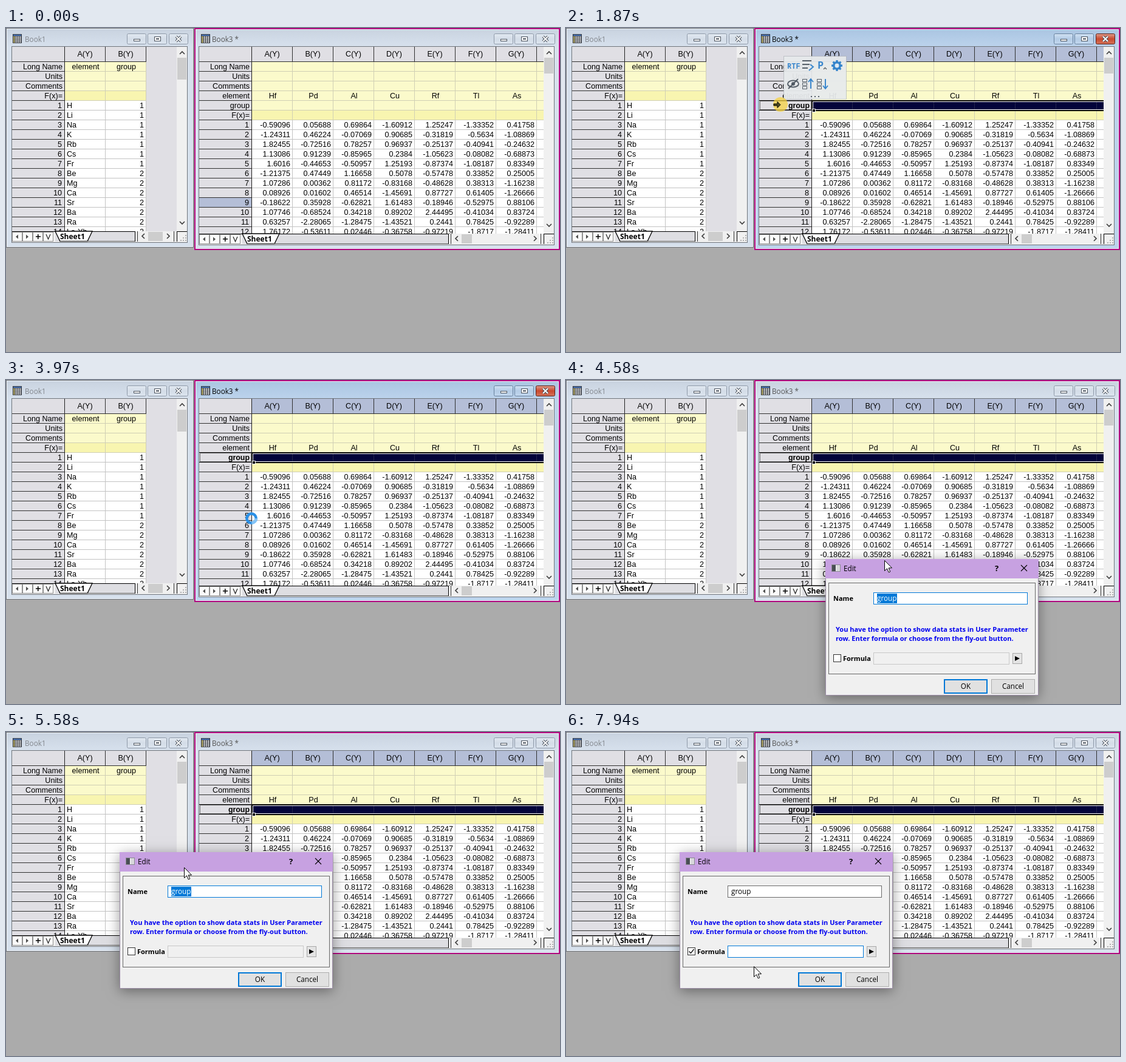
An HTML page with a canvas that plays this animation: 912x534 px, repeating every 8 s.

```html
<!DOCTYPE html>
<html lang="en">
<head>
<meta charset="utf-8">
<title>Worksheet label row</title>
<style>
html, body { margin: 0; width: 100%; height: 100%; overflow: hidden; background: #ababab; }
canvas { display: block; }
</style>
</head>
<body>
<canvas id="stage" width="912" height="534"></canvas>
<script>
const ctx = document.getElementById('stage').getContext('2d');
const LOOP = 8000;
const ARIAL = '12.6px "Liberation Sans", sans-serif';
const ARIAL_BOLD = 'bold 12.4px "Liberation Sans", sans-serif';
const UI = '11.7px "Open Sans", sans-serif';
const UI_BOLD = 'bold 11px "Open Sans", sans-serif';
const HEAD = '#e0dfe4', PICKED = '#b4bed7', BLUE = '#0078d7';

const table = `-0.59096 0.05688 0.69864 -1.60912 1.25247 -1.33352 0.41758
-1.24311 0.46224 -0.07069 0.90685 -0.31819 -0.5634 -1.08869
1.82455 -0.72516 0.78257 0.96937 -0.25137 -0.40941 -0.24632
1.13086 0.91239 -0.85965 0.2384 -1.05623 -0.08082 -0.68873
1.6016 -0.44653 -0.50957 1.25193 -0.87374 -1.08187 0.83349
-1.21375 0.47449 1.16658 0.5078 -0.57478 0.33852 0.25005
1.07286 0.00362 0.81172 -0.83168 -0.48628 0.38313 -1.16238
0.08926 0.01602 0.46514 -1.45691 0.87727 0.61405 -1.26666
-0.18622 0.35928 -0.62821 1.61483 -0.18946 -0.52975 0.88106
1.07746 -0.68524 0.34218 0.89202 2.44495 -0.41034 0.83724
0.63257 -2.28065 -1.28475 -1.43521 0.2441 0.78425 -0.92289
1.76172 -0.53611 0.02446 -0.36758 -0.97219 -1.8717 -1.28411`
  .split('\n').map(row => row.split(' '));
const groups = 'H Li Na K Rb Cs Fr Be Mg Ca Sr Ba Ra La-Yb'.split(' ')
  .map((name, i) => [name, i < 7 ? '1' : '2']);

const listBook = {
  x: 0, w: 309, h: 362, title: 'Book1', left: 10, cols: 2, view: 281, bottom: 335,
  slab: 212, thumbX: 234, thumbW: 24, thumbH: 36, rows: groups, textFirst: true,
  labels: ['Long Name', 'Units', 'Comments', 'F(x)='],
  labelCells: { 0: ['element', 'group'] }
};
const dataBook = {
  x: 310, w: 602, h: 366, title: 'Book3 *', left: 318, cols: 8, view: 885, bottom: 339,
  slab: 728, thumbX: 750, thumbW: 17, thumbH: 26, rows: table,
  labels: ['Long Name', 'Units', 'Comments', 'element', 'group', 'F(x)='],
  labelCells: { 3: 'Hf Pd Al Cu Rf Tl As'.split(' ') }
};
const menuGroups = [
  ['Cut', 'Copy', 'Paste', 'Clear'],
  ['Edit...', 'Delete'],
  ['Insert', 'Add User Parameters...', 'Move Up'],
  ['Move Down', 'Hide'],
  ['Set Data Style', 'Fill Cells With'],
  ['Row Height...', 'Format Cells...'],
  ['View']
];

// time, x, y, easing power of the move that ends there
const pointerPath = [
  [240, 850, 540, 1], [1010, 358, 123, 1.7], [1320, 353, 126, 2], [2730, 353, 126, 1],
  [3330, 405, 227, 1.6], [3500, 404, 227, 1], [4200, 404, 227, 1], [4500, 524, 295, 2],
  [4750, 524, 300, 1], [5030, 319, 230, 1], [5200, 284, 203, 1.6], [5370, 284, 203, 1],
  [5580, 293, 223, 1], [6200, 209, 367, 1.7], [6790, 209, 367, 1], [7540, 309, 386, 1.7]
];
const pressTimes = [[1480, 2010], [3740, 3970], [4750, 5370], [6460, 6600]];
const during = (t, from, to) => t >= from && t < to;

function pointerAt(t) {
  const i = pointerPath.findIndex(p => p[0] > t);
  if (i === 0) return { x: pointerPath[0][1], y: pointerPath[0][2] };
  if (i < 0) { const p = pointerPath.at(-1); return { x: p[1], y: p[2] }; }
  const [t0, x0, y0] = pointerPath[i - 1], [t1, x1, y1, power] = pointerPath[i];
  const k = 1 - Math.pow(1 - (t - t0) / (t1 - t0), power);
  return { x: Math.round(x0 + (x1 - x0) * k), y: Math.round(y0 + (y1 - y0) * k) };
}

function rect(x, y, w, h, color) {
  ctx.fillStyle = color;
  ctx.fillRect(x, y, w, h);
}
function box(x, y, w, h, fill, line, width = 1) {
  rect(x, y, w, h, line);
  rect(x + width, y + width, w - 2 * width, h - 2 * width, fill);
}
function text(s, x, y, font = ARIAL, color = '#000', align = 'left') {
  ctx.font = font;
  ctx.fillStyle = color;
  ctx.textAlign = align;
  ctx.fillText(s, x, y);
}
function path(points, stroke, width = 1, fill) {
  ctx.beginPath();
  points.forEach(([x, y], i) => i ? ctx.lineTo(x, y) : ctx.moveTo(x, y));
  if (fill) { ctx.closePath(); ctx.fillStyle = fill; ctx.fill(); }
  if (stroke) { ctx.strokeStyle = stroke; ctx.lineWidth = width; ctx.stroke(); }
}
function disc(x, y, r, color) {
  ctx.beginPath();
  ctx.arc(x, y, r, 0, 7);
  ctx.fillStyle = color;
  ctx.fill();
}
function clipped(x, y, w, h, draw) {
  ctx.save();
  ctx.beginPath();
  ctx.rect(x, y, w, h);
  ctx.clip();
  draw();
  ctx.restore();
}
function chevron(x, y, dx, dy, color = '#404040') {
  path([[x - dx * 2 - dy * 4, y - dy * 2 - dx * 4], [x + dx * 2, y + dy * 2],
    [x - dx * 2 + dy * 4, y - dy * 2 + dx * 4]], color, 1.7);
}

function titleBar(b, active) {
  const { x, w, h } = b, owned = b === dataBook;
  const shade = ctx.createLinearGradient(0, 0, 0, 31);
  shade.addColorStop(0, active ? '#a9c4e1' : '#c8d2df');
  shade.addColorStop(1, active ? '#bcd3ec' : '#d7e1ed');
  rect(x, 0, w, h, active ? '#bcd3ec' : '#d7e1ed');
  rect(x, 0, w, 31, shade);
  ctx.strokeStyle = owned ? '#b0087f' : '#686c72';
  ctx.lineWidth = owned ? 2 : 1;
  const inset = owned ? 1 : 0.5;
  ctx.strokeRect(x + inset, inset, w - 2 * inset, h - 2 * inset);
  ctx.strokeStyle = '#eef3f9';
  ctx.lineWidth = 1;
  ctx.strokeRect(x + inset * 2 + 0.5, inset * 2 + 0.5, w - inset * 4 - 1, h - inset * 4 - 1);

  box(x + 11, 10, 15, 15, '#30343c', '#30343c');
  rect(x + 12, 11, 13, 2, '#4f79b8');
  for (let r = 0; r < 4; r++)
    for (let c = 0; c < 4; c++)
      rect(x + 12 + c * 3.4, 14 + r * 2.7, 2.4, 1.7, c ? '#fff' : '#f2e27a');
  text(b.title, x + (owned ? 29 : 31), 23, UI, active ? '#000' : owned ? '#555' : '#82868c');

  const right = x + w - (owned ? 10 : 11);
  [99, 65, 30].forEach((offset, i) => {
    const bx = right - offset, red = active && i === 2;
    const face = ctx.createLinearGradient(0, 9, 0, 27);
    face.addColorStop(0, red ? '#e0a090' : active ? '#d2e2f3' : '#e2e9f1');
    face.addColorStop(0.5, red ? '#c9492f' : active ? '#b4cce6' : '#d4dde8');
    face.addColorStop(1, red ? '#d6765c' : active ? '#c3d8ef' : '#dce5ef');
    ctx.beginPath();
    ctx.roundRect(bx + 0.5, 9.5, 31, 17, 2);
    ctx.fillStyle = face;
    ctx.fill();
    ctx.strokeStyle = red ? '#5b2119' : active ? '#67809d' : '#8e99a8';
    ctx.stroke();
    const mid = bx + 16, ink = '#4b535e';
    if (i === 0) box(mid - 5, 18, 11, 4, '#fff', ink);
    if (i === 1) { box(mid - 5, 14, 11, 8, '#fff', ink); rect(mid - 2, 17, 5, 2, ink); }
    if (i === 2) for (const [color, width] of [[ink, 4], ['#fff', 2]]) {
      path([[mid - 4, 14], [mid + 4, 22]], color, width);
      path([[mid + 4, 14], [mid - 4, 22]], color, width);
    }
  });
}

function grid(b, selected) {
  const first = b.left + 86, count = b.labels.length, dataTop = 56 + count * 16;
  const colX = c => first + 1 + c * 67;
  rect(b.left, 31, b.view - b.left, b.bottom - 31, HEAD);
  for (let c = 0; c < b.cols; c++) {
    const x = colX(c);
    rect(x, 31, 66, 24, selected ? PICKED : HEAD);
    rect(x + 66, 31, 1, 24, '#303030');
    if (c < 7) text('ABCDEFG'[c] + '(Y)', x + 33, 47, ARIAL, '#000', 'center');
  }
  rect(first, 31, 1, b.bottom - 31, '#202020');
  rect(b.left, 55, colX(b.cols) - b.left, 1, '#303030');

  for (let r = 0; r < count + b.rows.length; r++) {
    const y = 56 + r * 16, label = r < count, row = r - count;
    const tone = !label ? '#fff' : r === count - 1 ? '#f8f5b0' : '#fbfacb';
    const marked = b === dataBook && !selected && row === 8;
    const bold = b === dataBook && selected && r === 4;
    if (marked) rect(b.left, y, 86, 15, PICKED);
    rect(b.left, y + 15, 86, 1, '#303030');
    text(label ? b.labels[r] : row + 1, first - (label ? 3 : 4), y + 12,
      bold ? ARIAL_BOLD : ARIAL, '#000', 'right');
    const cells = label ? b.labelCells[r] || [] : b.rows[row];
    for (let c = 0; c < b.cols; c++) {
      const x = colX(c);
      rect(x, y, 67, 16, label ? '#d0cfb4' : '#c3c3c3');
      rect(x, y, 66, 15, tone);
      if (!cells[c]) continue;
      if (label) text(cells[c], x + 34, y + 12, ARIAL, '#000', 'center');
      else if (b.textFirst && c === 0) text(cells[c], x + 3, y + 12);
      else text(cells[c], x + 63, y + 12, ARIAL, '#000', 'right');
    }
  }
  if (b === dataBook && selected) {
    rect(first + 1, 119, 500, 18, '#000');
    rect(first + 2, 121, 500, 14, '#fff');
    rect(first + 3, 122, 500, 12, '#03043a');
    for (let c = 1; c < 8; c++) rect(colX(c) - 1, 122, 1, 12, '#24254a');
    box(first + 1, 133, 6, 6, '#000', '#fff');
    ctx.setLineDash([1, 1]);
    ctx.strokeStyle = '#000';
    ctx.lineWidth = 1;
    ctx.strokeRect(b.left + 1.5, 120.5, 84, 14);
    ctx.setLineDash([]);
    rect(b.left, 119, 87, 1, '#000');
    rect(b.left, 135, 87, 1, '#000');
  }
}

function bars(b) {
  const y = b.bottom + 1, v = b.view, right = v + 17;
  rect(v, 31, 17, b.bottom - 31, '#f0f0f0');
  chevron(v + 9, 41, 0, -1);
  chevron(v + 9, b.bottom - 14, 0, 1);
  rect(v + 1, 49, 15, b.thumbH, '#cdcdcd');

  rect(b.left, b.bottom, right - b.left, 18, '#f0f0f0');
  rect(b.left, b.bottom, b.slab - b.left + 1, 1, '#000');
  for (let i = 0; i < 4; i++) {
    const x = b.left + i * 17.3 | 0, m = x + 8, c = y + 8;
    box(x, y, 17, 16, '#fafafa', '#909090');
    if (i < 2) {
      const s = i ? 1 : -1;
      path([[m + 2 * s, c], [m - 2 * s, c - 3.5], [m - 2 * s, c + 3.5]], null, 1, '#505050');
    }
    if (i === 2) { rect(m - 3, c - 1, 8, 1.5, '#000'); rect(m, c - 4, 1.5, 8, '#000'); }
    if (i === 3) path([[m - 3, c - 4], [m + 0.5, c + 4], [m + 4, c - 4]], '#202020', 1.2);
  }
  const tab = b.left + 71;
  rect(tab, y, b.slab - tab, 16, '#dedee2');
  path([[tab, y - 1], [tab + 8, y + 15.5], [tab + 53, y + 15.5], [tab + 61, y - 1]], '#000', 1.3, '#fff');
  rect(tab + 8, y + 15, b.slab - tab - 7, 1, '#555');
  rect(b.slab, y - 1, 1, 17, '#000');
  text('Sheet1', tab + 8, y + 12, 'bold 12px "Open Sans", sans-serif');

  rect(b.slab + 4, y - 1, 1, 17, '#333');
  chevron(b.slab + 14, y + 7, -1, 0);
  chevron(v - 14, y + 7, 1, 0);
  rect(b.thumbX, y, b.thumbW, 15, '#cdcdcd');
  rect(v - 5, y - 1, 1, 17, '#333');
  rect(v, y - 1, 1, 17, '#000');
  rect(v, y - 1, 17, 1, '#000');
  for (let i = 0; i < 3; i++)
    for (let j = 0; j <= i; j++) rect(right - 3 - j * 4, y + 5 + i * 4, 2, 2, '#b0b0b0');
}

function book(b, active, selected) {
  titleBar(b, active);
  const right = b.view + 17;
  box(b.left - 1, 30, right - b.left + 2, b.h - 38, '#f0f0f0', '#70757c');
  clipped(b.left, 31, b.view - b.left, b.bottom - 31, () => grid(b, selected));
  bars(b);
}

function toolbar(t) {
  const fade = Math.min(1, (t - 1600) / 270);
  ctx.globalAlpha = fade * 0.76;
  box(358, 46, 104, 72, '#f4f6f8', '#b4b8be');
  ctx.globalAlpha = fade * 0.92;
  const blue = '#2c7fca', gray = '#4c5660';
  text('RTF', 364, 67, 'bold 12px "Noto Sans Mono", monospace', blue);
  [54, 60, 66].forEach((y, i) => path([[389, y], [404 - i * 3, y]], gray, 2));
  path([[402, 60], [407, 64], [400, 70]], blue, 2);
  text('P', 414, 67, 'bold 16px "Open Sans", sans-serif', blue);
  path([[424, 68], [426.5, 65.5], [429, 68]], gray, 1.4);
  for (let i = 0; i < 8; i++) {
    const c = Math.cos(i * Math.PI / 4), s = Math.sin(i * Math.PI / 4);
    path([[446 + c * 5, 62 + s * 5], [446 + c * 9, 62 + s * 9]], blue, 3.4);
  }
  disc(446, 62, 7, blue);
  disc(446, 62, 3.4, '#eef2f6');
  ctx.beginPath();
  ctx.ellipse(374, 92, 9, 5.5, 0, 0, 7);
  ctx.strokeStyle = gray;
  ctx.lineWidth = 2;
  ctx.stroke();
  disc(374, 92, 3, gray);
  path([[366, 100], [382, 84]], gray, 2);
  [389, 413].forEach((x, i) => {
    for (let k = 0; k < 3; k++) box(x, 84 + k * 6, 8, 5, '#f4f6f8', gray);
    const s = i ? 1 : -1;
    path([[x + 14, 92 - 8 * s], [x + 14, 92 + 7 * s]], blue, 2);
    path([[x + 10, 92 + 3 * s], [x + 14, 92 + 8 * s], [x + 18, 92 + 3 * s]], blue, 2);
  });
  for (let i = 0; i < 3; i++) rect(403 + i * 6, 112, 2, 2, gray);
  ctx.globalAlpha = 1;
}

function shadow(x, y, w, h, blur, alpha) {
  ctx.save();
  ctx.shadowColor = `rgba(0,0,0,${alpha})`;
  ctx.shadowBlur = blur;
  ctx.shadowOffsetY = blur / 5;
  rect(x, y, w, h, '#f0f0f0');
  ctx.restore();
}

function menu(t, pointer) {
  ctx.globalAlpha = t < 2080 ? 0.5 : 1;
  shadow(352, 126, 201, 405, 6, 0.5);
  box(352, 126, 201, 405, '#f2f2f2', '#a8a8a8');
  let y = 128;
  menuGroups.forEach((items, g) => {
    if (g) { rect(380, y + 3, 170, 1, '#d0d0d0'); y += 8; }
    for (const item of items) {
      if (t >= 2800 && during(pointer.y, y, y + 22)) rect(355, y, 195, 22, '#91c9f7');
      text(item, 384, y + 15, UI);
      if (/Insert|Style|With|View/.test(item)) chevron(540, y + 11, 0.7, 0);
      y += 22;
    }
  });
  ctx.globalAlpha = 1;
}

function dialog(t, x, y) {
  ctx.save();
  ctx.globalAlpha = Math.min(1, 0.4 + (t - 4200) / 150);
  shadow(x, y, 351, 225, 20, 0.4);
  ctx.translate(x, y);
  box(0, 0, 351, 225, '#f0f0f0', '#9b8ca6');
  rect(0, 0, 351, 32, '#c7a1e1');
  box(10, 9, 15, 12, '#fff', '#8a8a92');
  rect(11, 10, 6, 10, '#4a4e54');
  rect(18, 10, 6, 10, '#d8d8dc');
  text('Edit', 30, 20, UI);
  text('?', 282, 20, 'bold 13px "Open Sans", sans-serif', '#000', 'center');
  path([[322, 10], [332, 20]], '#000', 1.1);
  path([[332, 10], [322, 20]], '#000', 1.1);
  box(5, 39, 341, 151, '#f0f0f0', '#686868');

  const naming = t < 6460;
  text('Name', 13, 69, UI_BOLD);
  box(79, 55, 254, 20, '#fff', naming ? BLUE : '#6a6a6a');
  if (naming) rect(85, 57, 33, 16, BLUE);
  text('group', 85, 69, UI, naming ? '#fff' : '#000');
  text('You have the option to show data stats in User Parameter', 17, 120, UI_BOLD, '#0000f0');
  text('row. Enter formula or choose from the fly-out button.', 17, 135, UI_BOLD, '#0000f0');

  const over = during(t, 6000, 6950), pressed = during(t, 6460, 6690), checked = t >= 6690;
  box(13, 157, 13, 13, pressed ? '#c3dff5' : '#fff', pressed ? '#005499' : over ? BLUE : '#333');
  if (checked) path([[15.5, 163.5], [18.5, 166.5], [23.5, 160]], over ? BLUE : '#111', 1.4);
  text('Formula', 29, 168, UI_BOLD);
  const enabled = t >= 6600;
  box(79, 154, 224, 20, enabled ? '#fff' : '#f0f0f0', checked ? BLUE : enabled ? '#6a6a6a' : '#c8c8c8');
  if (during(t, 6690, 6880) || during(t, 7410, 7940)) rect(85, 156, 1, 15, '#000');
  box(308, 155, 16, 18, '#e4e4e4', '#a8a8a8');
  path([[312, 160], [320, 164], [312, 168]], null, 1, '#000');

  box(195, 198, 72, 24, '#e1e1e1', BLUE, 2);
  text('OK', 231, 214, UI, '#000', 'center');
  box(273, 198, 72, 24, '#e1e1e1', '#adadad');
  text('Cancel', 309, 214, UI, '#000', 'center');
  ctx.restore();
}

function drawPointer(t, { x, y }) {
  if (during(t, 3970, 4200)) {
    const turn = (t - 3970) / 160;
    ctx.lineWidth = 4.5;
    [['#2b90e6', 0, 6.3], ['#84c4f6', turn, turn + 1.5]].forEach(([color, from, to]) => {
      ctx.beginPath();
      ctx.arc(404, 228, 7.7, from, to);
      ctx.strokeStyle = color;
      ctx.stroke();
    });
  } else if (during(t, 960, 2010)) {
    path([[-11, -1], [-5, -1], [-5, -4.5], [0, 0.5], [-5, 5.5], [-5, 2], [-11, 2]]
      .map(([dx, dy]) => [x + dx, y + dy]), '#000', 1, '#4c4a20');
  } else {
    path([[0, 0], [0, 17], [4, 13.3], [6.8, 19.5], [9.3, 18.4], [6.6, 12.4], [12, 12.2], [0, 0]]
      .map(([dx, dy]) => [x + dx + 0.5, y + dy + 0.5]), '#000', 1, '#fff');
  }
}

function draw(t) {
  const pointer = pointerAt(t), drag = pointerAt(Math.max(4750, Math.min(t, 5300)));
  const active = during(t, 1480, 4200);
  rect(0, 0, 912, 534, '#ababab');
  book(listBook, false, false);
  book(dataBook, active, t >= 1480);
  if (during(t, 1600, 2010)) toolbar(t);
  if (during(t, 2010, 3970)) menu(t, pointer);
  if (t >= 4200) dialog(t, drag.x - 97, drag.y - 5);
  if (pressTimes.some(([from, to]) => during(t, from, to)))
    disc(pointer.x, pointer.y, 12, 'rgba(246,210,60,0.72)');
  if (t >= 240) drawPointer(t, pointer);
}

const start = performance.now();
function tick() {
  draw((performance.now() - start) % LOOP);
  requestAnimationFrame(tick);
}
tick();
</script>
</body>
</html>
```
